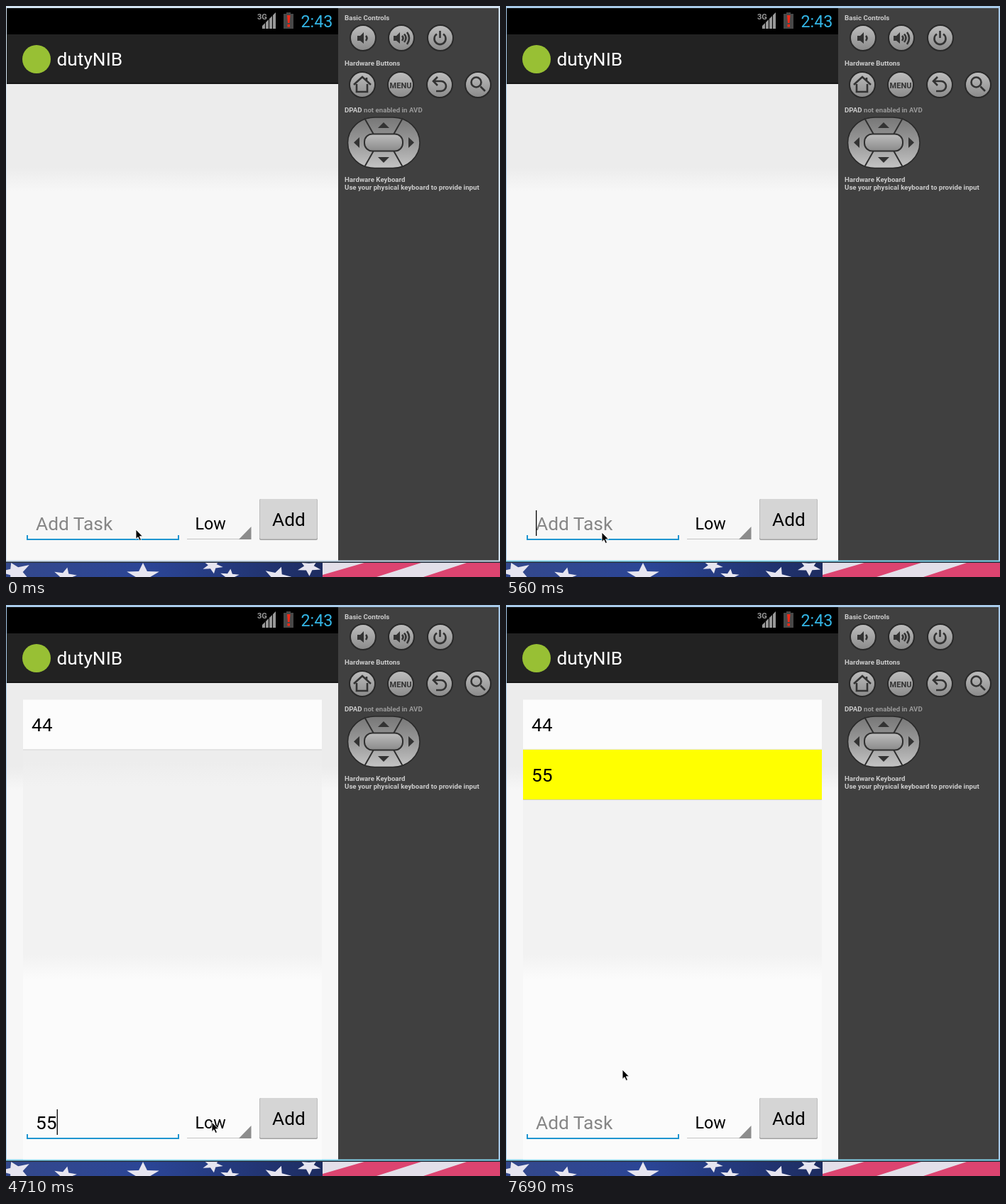
An HTML page for the animation above (8000 ms loop, 696 by 805 pixels).

```html
<!DOCTYPE html>
<html lang="en">
<head>
<meta charset="utf-8">
<title>Task list</title>
<style>
  html, body { margin: 0; width: 100%; height: 100%; overflow: hidden; }
  svg { display: block; width: 696px; height: 805px; font-family: Roboto, sans-serif; }
  .big { font-size: 26.3px; }
  .mid { font-size: 23.3px; }
  .label { font-size: 9.7px; font-weight: bold; fill: #ccc; }
  .icon { fill: none; stroke: #333; stroke-width: 2.6; }
  .solid { fill: #333; }
</style>
</head>
<body>
<svg viewBox="0 0 696 805">
  <defs>
    <linearGradient id="key" x2="0" y2="1"><stop stop-color="#bebebe"/><stop offset="1" stop-color="#8a8a8a"/></linearGradient>
    <linearGradient id="pad" x2="0" y2="1"><stop stop-color="#777"/><stop offset=".5" stop-color="#999"/><stop offset="1" stop-color="#c4c4c4"/></linearGradient>
    <linearGradient id="page" gradientUnits="userSpaceOnUse" x1="0" x2="0" y1="110" y2="782">
      <stop offset=".175" stop-color="#ececec"/><stop offset=".225" stop-color="#f7f7f7"/>
    </linearGradient>
    <linearGradient id="list" gradientUnits="userSpaceOnUse" x1="0" x2="0" y1="204" y2="782">
      <stop offset=".03" stop-color="#ededed"/><stop offset=".09" stop-color="#f2f2f2"/>
      <stop offset=".5" stop-color="#f2f2f2"/><stop offset=".56" stop-color="#fbfbfb"/>
    </linearGradient>
    <linearGradient id="cloth"><stop stop-color="#34498c"/><stop offset=".45" stop-color="#2b4596"/><stop offset="1" stop-color="#1d2c60"/></linearGradient>
    <filter id="shade" x="-20%" y="-20%" width="140%" height="140%"><feDropShadow dx="0" dy="2" stdDeviation="3" flood-opacity=".65"/></filter>
  </defs>

  <g id="flag">
    <path fill="url(#cloth)" d="M0 784H447V805H0Z"/>
    <path fill="#e3dfe9" d="M446 784H696V805H446Z"/>
    <path fill="#dc4470" d="M508 784H588L522 805H446V802ZM652 784H696V805H588Z"/>
    <g id="stars" fill="#e6e5f0"></g>
  </g>

  <rect id="frame" width="696" height="784"/>
  <rect id="base" y="781.5" width="696" height="2"/>
  <path fill="#222b38" d="M0 783.5H696V785H0Z"/>
  <path fill="#404040" d="M468 3H694V781.5H468Z"/>

  <g id="app">
    <path d="M1 3H468V40H1Z"/>
    <path fill="#222" d="M1 40H468V110H1Z"/>
    <path fill="#111" d="M1 108.5H468V110H1Z"/>
    <path fill="url(#page)" d="M1 110H468V781.5H1Z"/>

    <text x="354" y="19" font-size="11" font-weight="bold" fill="#999">3G</text>
    <path fill="#999" d="M361 32V28L365 24V32ZM366 32V23L370 19V32ZM371 32V18L375 14V32ZM376 32V13L380 9V32Z"/>
    <path fill="#484848" d="M395 9H401V11H405V32H391V11H395Z"/>
    <path fill="#f32a18" d="M396 13H400.5L399.5 24H397ZM396.5 26H400V29.5H396.5Z"/>
    <text class="mid" x="415.5" y="30" fill="#33b5e5">2:43</text>
    <circle cx="43" cy="75" r="20" fill="#98c034"/>
    <text class="big" x="71.500" y="84" fill="#fff">dutyNIB</text>

    <g id="first">
      <path fill="url(#list)" d="M24 204H445V781.5H24Z"/>
      <path fill="#fcfcfc" d="M24 133.500H445V204H24Z"/>
      <path fill="#d4d4d4" d="M24 203.500H445V204.500H24Z"/>
      <text class="big" x="36" y="178">44</text>
    </g>
    <g id="second">
      <path fill="#ff0" d="M24 204H445V274.500H24Z"/>
      <path fill="#d2d2a0" d="M24 274H445V275H24Z"/>
      <text class="big" x="36" y="249">55</text>
    </g>

    <path id="blurred" fill="none" stroke="#999" d="M30.500 747V751.500H242.500V747"/>
    <path id="focused" fill="none" stroke="#1f95d0" stroke-width="2" d="M30 746V752H243V746"/>
    <text id="entry" class="big" x="42" y="738.500"></text>
    <path id="caret" d="M0 711H1.300V747H0Z"/>

    <text id="level" class="mid" x="266.500" y="738"></text>
    <path fill="#c4c4c4" d="M255 751H345V752H255Z"/>
    <path fill="#8c8c8c" d="M328 752L345.500 734V752Z"/>
    <rect x="357" y="695" width="82" height="58" rx="2" fill="#a2a2a2"/>
    <rect x="357.500" y="695" width="81" height="56.500" rx="2" fill="#d5d5d5"/>
    <text class="big" x="375" y="732.500">Add</text>

    <g id="popup">
      <rect x="254.500" y="488.500" width="97" height="212" rx="2" fill="#eee" filter="url(#shade)"/>
      <path stroke="#cbcbcb" d="M255 559.500H351M255 630.500H351"/>
      <g class="mid"><text x="266.500" y="533">Low</text><text x="266.500" y="604">Med</text><text x="266.500" y="675">High</text></g>
    </g>
  </g>
  <path id="blank" d="M1 3H468V781.5H1Z"/>

  <g class="label">
    <text x="477" y="20">Basic Controls</text>
    <text x="477" y="83.500">Hardware Buttons</text>
    <text x="477" y="149.500">DPAD <tspan fill="#999">not enabled in AVD</tspan></text>
    <text x="477" y="248">Hardware Keyboard</text>
    <text x="477" y="259">Use your physical keyboard to provide input</text>
  </g>
  <g id="keys" fill="url(#key)" stroke="#292929" stroke-width="2"></g>

  <path class="solid" d="M495 42H499L504 37V53L499 49H495ZM546 42H550L555 37V53L550 49H546Z"/>
  <path class="icon" stroke-width="2" d="M507 42Q510 45 507 49M558 42Q561 45 558 49M561 39.500Q566 45 561 51M565 37Q571 45 565 54"/>
  <path class="icon" d="M607 39.500A8 8 0 1 0 616 39.500M611.500 35V45"/>
  <path class="icon" d="M490 111L502 100L514 111M494 110V121H509V110M508 105V101"/>
  <text x="556" y="115.500" text-anchor="middle" font-size="11" font-weight="bold" fill="#333">MENU</text>
  <path class="icon" d="M603 106H613A6.500 6.500 0 0 1 613 120H606M608 100L602 106L608 112"/>
  <path class="icon" d="M668.500 113.500L675 120"/>
  <circle class="icon" cx="662.500" cy="107.500" r="7"/>

  <rect x="481.500" y="157" width="101.500" height="71.500" rx="38" ry="35.700" fill="url(#pad)" stroke="#292929" stroke-width="1.600"/>
  <path fill="none" stroke="#303030" stroke-width="2" d="M505 158L518 181M559 158L546 181M505 227L518 204M559 227L546 204"/>
  <rect x="505" y="180.500" width="54" height="24" rx="11" fill="url(#key)" stroke="#303030" stroke-width="2"/>
  <path class="solid" d="M524 172L532 164L540 172ZM524 213H540L532 221ZM498 185V200L490 192.500ZM567 185V200L575 192.500Z"/>

  <path id="cursor" stroke="#fff" stroke-width=".9" d="M0 0V13.500L3 10.700L5.200 15.500L7.500 14.500L5.300 9.800H9.500Z"/>
</svg>
<script>
const LOOP = 8000;
const $ = id => document.getElementById(id);
const add = (parent, tag, attrs) => {
  const el = document.createElementNS("http://www.w3.org/2000/svg", tag);
  for (const name in attrs) el.setAttribute(name, attrs[name]);
  $(parent).append(el);
};

for (const [cx, cy] of [[503, 45], [557, 45], [612, 45], [502, 111], [556, 111], [611, 111], [665, 111]])
  add("keys", "circle", { cx, cy, r: 18 });

// x, y, size and turn of each star; only the strip below the window shows
for (const [x, y, size, turn] of [[14, 798, 23, -.3], [83, 804, 17, .2], [193, 803, 24, 0], [291, 789, 15, .5], [315, 804, 14, .1], [382, 805, 20, .3], [427, 791, 17, .6]]) {
  const points = Array.from({ length: 10 }, (_, i) => {
    const a = turn + i * Math.PI / 5, r = i % 2 ? size * .42 : size;
    return [x + r * Math.sin(a), Math.max(785, y - r * .75 * Math.cos(a))];
  });
  add("stars", "polygon", { points: points.join(" ") });
}

// Tracks hold each value until the next time
const pointer = [
  [0, 183, 738], [150, 170, 740], [290, 148, 742], [420, 135, 742], [810, 138, 738], [950, 145, 733],
  [2050, 190, 732], [2180, 290, 731], [2320, 385, 730], [2860, 350, 726], [2990, 304, 722],
  [3140, 240, 716], [3260, 193, 713], [4530, 230, 720], [4660, 290, 729], [4850, 333, 736],
  [5400, 330, 725], [5530, 318, 690], [5670, 304, 645], [5800, 295, 612], [5940, 293, 601],
  [6330, 308, 650], [6470, 328, 712], [6610, 342, 749], [6750, 368, 738], [6880, 395, 728],
  [7420, 350, 708], [7550, 250, 675], [7690, 164, 655]
];
const entry = [[0, ""], [1370, "4"], [1500, "44"], [2590, ""], [4120, "5"], [4260, "55"], [7150, ""]];
const caretOn = [[560, 1080], [1370, 2050], [2590, 3140], [3840, 4390], [4710, 5260], [6190, 6610], [7150, 7690]];
const at = (track, t) => track.findLast(step => step[0] <= t);
const within = (t, from, to = LOOP) => t >= from && t < to;
const show = (id, on) => $(id).style.display = on ? "" : "none";

function draw(t) {
  const [, x, y] = at(pointer, t), text = at(entry, t)[1];
  const open = within(t, 5260, 6190), active = t >= 150;
  $("cursor").setAttribute("transform", `translate(${x} ${y})`);
  $("frame").setAttribute("fill", active ? "#a9cbea" : "#d2e2f1");
  $("base").setAttribute("fill", active ? "#79d8ee" : "#c5d7e5");
  $("entry").textContent = text || "Add Task";
  $("entry").setAttribute("fill", text ? "#000" : "#868686");
  $("caret").setAttribute("transform", `translate(${42 + text.length * 14.8} 0)`);
  $("level").textContent = within(t, 6190, 7150) ? "Med" : "Low";
  show("caret", caretOn.some(([from, to]) => within(t, from, to)));
  show("first", t >= 2590);
  show("second", t >= 7150);
  show("popup", open);
  show("focused", !open);
  show("blurred", open);
  show("blank", within(t, 420, 560));
}

const start = performance.now();
(function tick() {
  draw((performance.now() - start) % LOOP);
  requestAnimationFrame(tick);
})();
</script>
</body>
</html>
```
